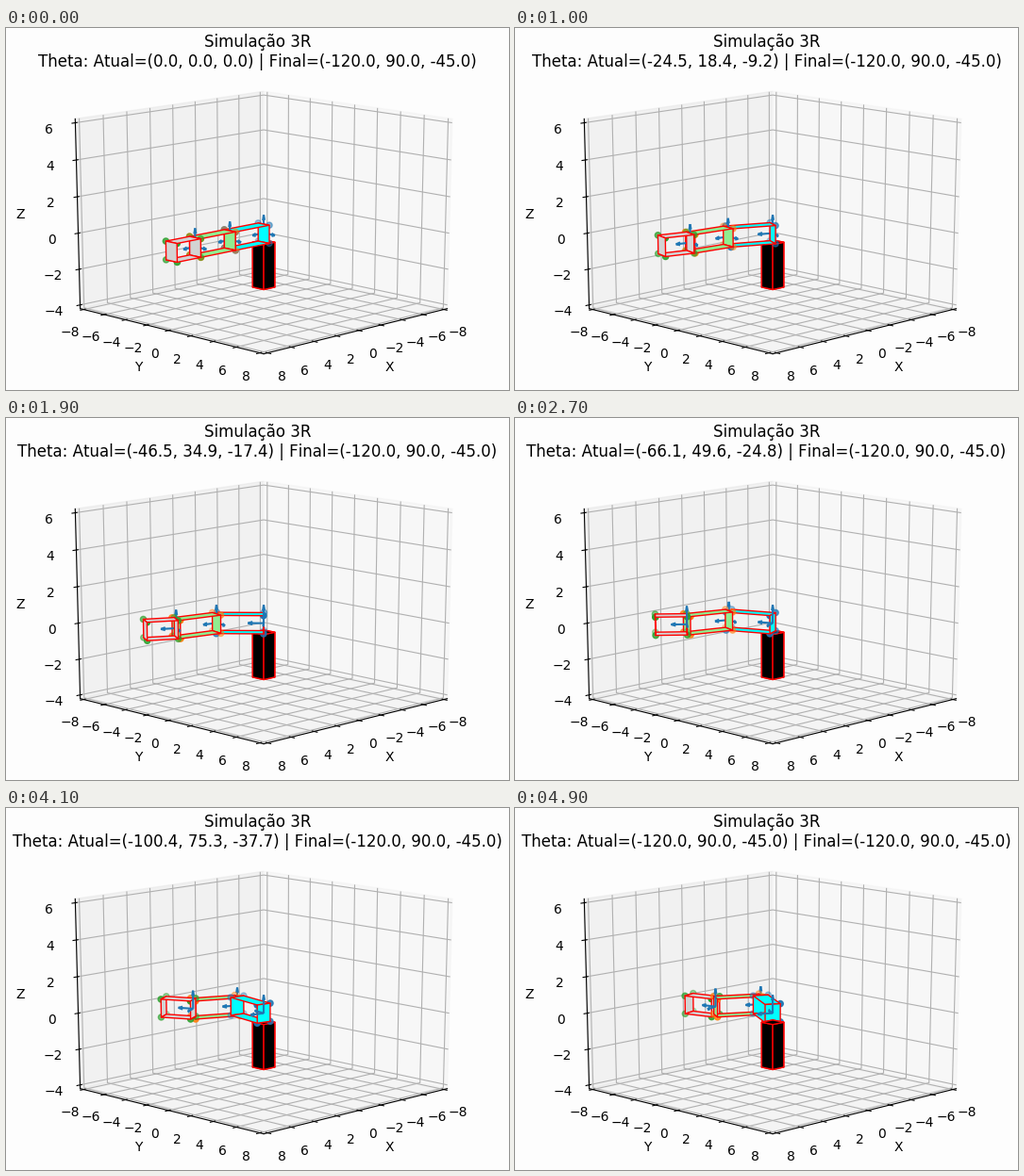
Animation of 533x384 px, one loop 7.9 s. Source, as a matplotlib script:

```python
import matplotlib.pyplot as plt
import numpy as np
from matplotlib.animation import FuncAnimation
from mpl_toolkits.mplot3d.art3d import Poly3DCollection

W, H, DPI = 533, 384, 100
STEPS, FRAMES, INTERVAL = 50, 79, 100
FINAL = np.array([-120.0, 90.0, -45.0])
LENGTHS = (3, 3, 2)
COLORS = ("cyan", "lightgreen", "lightgray")
AX_W, AX_H = 495, 370           # axes size and centre in pixels
CX, CY = 266.4, 203.4
UNIT_ZOOM = np.sqrt(3) / 1.8294640721620434   # makes the plot box a unit cube

# Vertices 0-3 close one end, 4-7 the other
CAPS = [(0, 1, 2, 3), (4, 5, 6, 7)]
PLATES = [(0, 1, 5, 4), (2, 3, 7, 6)]
SIDES = [(1, 2, 6, 5), (0, 3, 7, 4)]


def padded(lo, hi):
    """Limits with a small margin beyond the outer ticks."""
    pad = (hi - lo) / 48
    return lo - pad, hi + pad


LIMITS = dict(xlim=padded(-8, 8), ylim=padded(-8, 8), zlim=padded(-4, 6))

plt.rcParams["font.family"] = "DejaVu Sans"
plt.rcParams["text.kerning_factor"] = 6
fig = plt.figure(figsize=(W / DPI, H / DPI), dpi=DPI, facecolor="#fdfdfd")
ax = fig.add_axes([(CX - AX_W / 2) / W, 1 - (CY + AX_H / 2) / H,
                   AX_W / W, AX_H / H], projection="3d", facecolor="none")
ax.apply_aspect = lambda position=None: None   # let the cube fill the rectangle
ax.set_box_aspect((1, 1, 1), zoom=UNIT_ZOOM)
ax.view_init(elev=15, azim=45)
ax.set(xticks=range(-8, 9, 2), yticks=range(-8, 9, 2), zticks=range(-4, 7, 2),
       xlabel="X", ylabel="Y", zlabel="Z")
title = fig.suptitle("", y=.985)


def box(x0, x1, z0, z1):
    """Corners of a box one unit wide in y."""
    ring = [(-.5, z0), (.5, z0), (.5, z1), (-.5, z1)]
    return np.array([(x, y, z) for x in (x0, x1) for y, z in ring])


def add_faces(points, faces, color):
    poly = Poly3DCollection([points[list(f)] for f in faces], facecolors=color,
                            edgecolors="r", linewidths=1)
    return ax.add_collection3d(poly)


def rot_z(deg):
    c, s = np.cos(np.radians(deg)), np.sin(np.radians(deg))
    return np.array([[c, -s, 0], [s, c, 0], [0, 0, 1]])


def fmt(angles):
    return "(" + ", ".join(f"{a:.1f}" for a in angles) + ")"


add_faces(box(-.5, .5, -3, -.5), CAPS + PLATES + SIDES, "black")
parts = []


def draw(i):
    while parts:
        parts.pop().remove()
    theta = FINAL * min(i, STEPS - 1) / (STEPS - 1) + 0.0   # no negative zero
    origin = np.zeros(3)
    for k, (angle, length) in enumerate(zip(np.cumsum(theta), LENGTHS)):
        rot = rot_z(angle)
        pts = box(0, length, -.5, .5) @ rot.T + origin
        parts.append(ax.scatter(*pts.T, color=f"C{k}"))
        parts.append(add_faces(pts, CAPS + PLATES, COLORS[k]))
        parts.append(ax.quiver(*np.tile(origin, (3, 1)).T, *rot, color="C0"))
        origin = origin + length * rot[:, 0]
    ax.set(**LIMITS)
    title.set_text(f"Simulação 3R\nTheta: Atual={fmt(theta)} | Final={fmt(FINAL)}")
    return parts


anim = FuncAnimation(fig, draw, frames=FRAMES, interval=INTERVAL,
                     repeat=True, repeat_delay=0)
plt.show()
```
